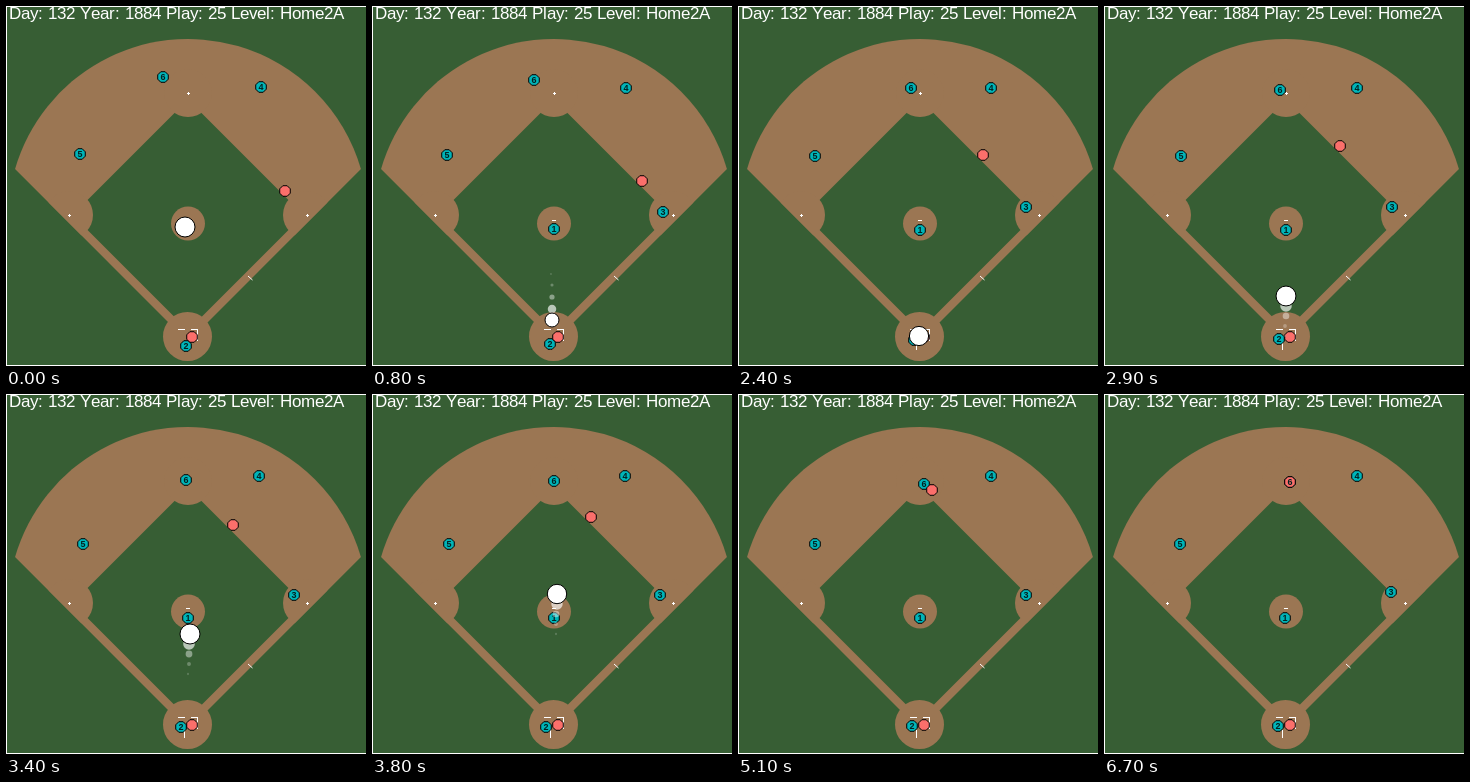
Write an HTML page with a canvas that moves like this. It is 360x360 px and loops after 6.8 s.

```html
<!DOCTYPE html>
<html lang="en">
<head>
<meta charset="utf-8">
<title>Baseball play</title>
<style>
html, body { margin: 0; width: 100%; height: 100%; overflow: hidden; background: #fff; }
canvas { display: block; }
</style>
</head>
<body>
<canvas id="stage" width="360" height="360"></canvas>
<script>
const ctx = document.getElementById('stage').getContext('2d');
const STEP = 100, STEPS = 68;
const GRASS = '#375e34', DIRT = '#9b7653', CYAN = '#00b4b8', PINK = '#fb6f6b';
const MID = 182, BASE_Y = 209, BASE_GAP = 119, INFIELD = 115.5;

const settle = k => 1 - (1 - k) ** 2;
const cover = k => k + k * k - k ** 3;
const sprint = k => k ** 1.2;
const clamp = k => Math.min(1, Math.max(0, k));
const mix = (a, b, k) => a + (b - a) * k;

// Each player runs from one spot to another until step `end`, then may drift back
const DRIFT_START = 56, DRIFT_END = 67;
const fielders = [
  { label: '1', from: [181, 219], to: [182, 224], end: 12, ease: settle, drift: [-1, 0] },
  { label: '2', from: [180, 340], to: [174, 332], end: 51, ease: settle },
  { label: '3', from: [293, 210], to: [288, 201], end: 24, ease: cover, drift: [-1, -3], enter: 1 },
  { label: '4', from: [255, 81], to: [253, 82], end: 20, ease: settle },
  { label: '5', from: [74, 148], to: [77, 150], end: 20, ease: cover, drift: [-1, 0] },
  { label: '6', from: [157, 71], to: [186, 90], end: 54, ease: cover, drift: [0, -2] }
];
const batter = { from: [186, 331], to: [186, 331], end: 1, ease: settle };
const runner = { from: [279, 185], to: [186, 88], end: 55, ease: sprint };

// Ball size stands for height: it goes from r0 to r1 with a rise of `lift` midway
const flights = [
  { show: 0, start: 0, end: 9, from: [179, 221], to: [180, 326], r0: 10, r1: 6.6, lift: 0 },
  { show: 24, start: 25, end: 49, from: [181, 330], to: [188, 90], r0: 9.6, r1: 7.3, lift: 1.35 }
];

function spot({ from, to, end, ease, drift = [0, 0] }, n) {
  const k = ease(clamp(n / end));
  const d = clamp((n - DRIFT_START) / (DRIFT_END - DRIFT_START));
  return from.map((v, i) => Math.round(mix(v, to[i], k) + drift[i] * d));
}

function paint(fill, outline) {
  ctx.fillStyle = fill;
  ctx.fill();
  if (!outline) return;
  ctx.strokeStyle = '#000';
  ctx.lineWidth = 1;
  ctx.stroke();
}

function disc(x, y, r, fill, outline) {
  ctx.beginPath();
  ctx.arc(x, y, r, 0, 2 * Math.PI);
  paint(fill, outline);
}

function polygon(x, y, r, sides, turn, fill, outline) {
  ctx.beginPath();
  for (let i = 0; i < sides; i++) {
    const a = turn + i * 2 * Math.PI / sides;
    ctx.lineTo(x + r * Math.cos(a), y + r * Math.sin(a));
  }
  ctx.closePath();
  paint(fill, outline);
}

const token = (x, y, fill) => polygon(x, y, 5.7, 8, Math.PI / 8, fill, true);

function bar(x, y, w, h) {
  ctx.fillStyle = '#fff';
  ctx.fillRect(x, y, w, h);
}

// Sets type with whole-pixel advances, like hinted screen text
function screenText(text, x, y) {
  for (const ch of text) {
    ctx.fillText(ch, x, y);
    x += Math.round(ctx.measureText(ch).width - 0.02);
  }
}

function field() {
  bar(0, 0, 360, 360);
  ctx.fillStyle = GRASS;
  ctx.fillRect(1, 1, 359, 358);

  const bases = [[MID - BASE_GAP, BASE_Y], [MID, 87], [MID + BASE_GAP, BASE_Y]];
  ctx.save();
  ctx.beginPath();
  ctx.moveTo(MID, 336);
  ctx.arc(MID, 213, 180, Math.atan2(-50, -173), Math.atan2(-50, 173));
  ctx.closePath();
  ctx.clip();
  ctx.fillStyle = DIRT;
  ctx.fillRect(0, 0, 360, 360);
  polygon(MID, BASE_Y, INFIELD, 4, 0, GRASS);
  bases.forEach(([x, y]) => disc(x, y, 24, DIRT));
  ctx.restore();
  disc(MID, 217.5, 17, DIRT);
  disc(MID - 0.5, 330.5, 24.5, DIRT);

  bases.forEach(([x, y]) => {
    bar(x - 1, y, 3, 1);
    bar(x, y - 1, 1, 3);
  });
  bar(180, 214, 4, 1);
  bar(172, 323, 7, 1);
  bar(185, 323, 7, 1);
  bar(191, 323, 1, 12);
  bar(178, 336, 1, 8);
  ctx.strokeStyle = '#fff';
  ctx.lineWidth = 1;
  ctx.beginPath();
  ctx.moveTo(242, 270);
  ctx.lineTo(246.5, 274);
  ctx.stroke();

  ctx.font = '17px "Liberation Sans", Arial, sans-serif';
  ctx.textAlign = 'left';
  ctx.fillStyle = '#fff';
  screenText('Day: 132 Year: 1884 Play: 25 Level: Home2A', 3, 13);
}

function players(n) {
  const onField = fielders.filter(p => n >= (p.enter || 0));
  onField.forEach(p => token(...spot(p, n), CYAN));
  [batter, runner].forEach(p => token(...spot(p, n), PINK));
  ctx.font = 'bold 9px "Liberation Sans", Arial, sans-serif';
  ctx.textAlign = 'center';
  ctx.fillStyle = '#022';
  onField.forEach(p => {
    const [x, y] = spot(p, n);
    ctx.fillText(p.label, x, y + 3);
  });
}

function ball(n) {
  const f = flights.find(f => n >= f.show && n <= f.end);
  if (!f) return;
  for (let back = Math.min(4, n - f.show); back >= 0; back--) {
    const k = clamp((n - back - f.start) / (f.end - f.start));
    const [x, y] = f.from.map((v, i) => Math.round(mix(v, f.to[i], k)));
    const r = mix(f.r0, f.r1, k) + f.lift * 4 * k * (1 - k);
    ctx.globalAlpha = 0.65 ** back;
    disc(x, y, r * 0.58 ** back, '#fff', back === 0);
  }
  ctx.globalAlpha = 1;
}

function draw(n) {
  field();
  players(n);
  ball(n);
}

const start = performance.now();
function tick() {
  draw(Math.floor((performance.now() - start + 1) / STEP) % STEPS);
  requestAnimationFrame(tick);
}
draw(0);
requestAnimationFrame(tick);
</script>
</body>
</html>
```
